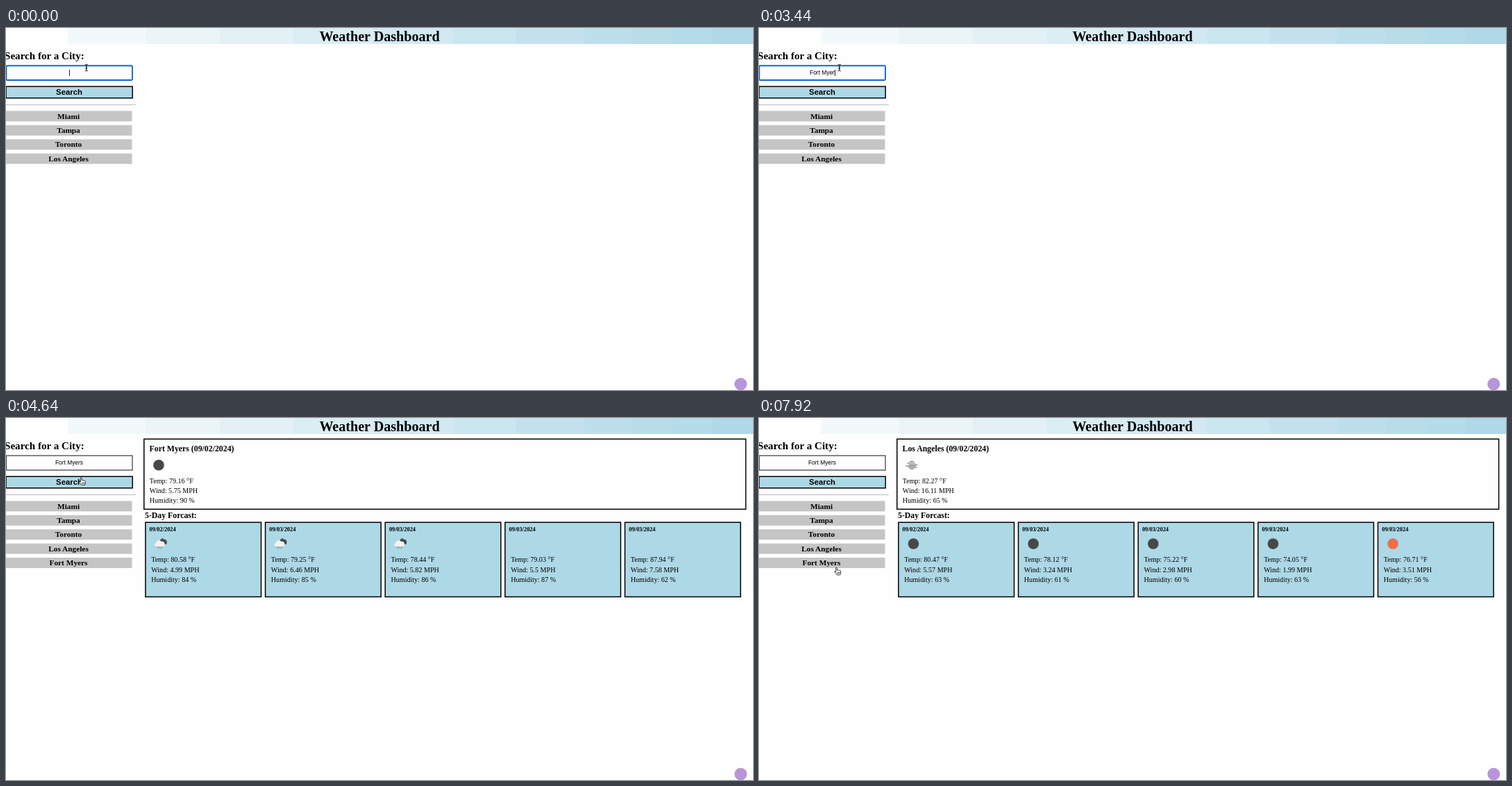
These frames come from a looping animation (1076 by 521 pixels, 8000 ms). An HTML page:

```html
<!DOCTYPE html>
<html lang="en">
<head>
<meta charset="utf-8">
<title>Weather Dashboard</title>
<style>
  html, body { margin: 0; width: 100%; height: 100%; overflow: hidden; background: #fefefe; }
  svg { display: block; width: 100%; height: 100%; }
  text { font-family: "Liberation Serif", "Times New Roman", serif; font-size: 10.08px; fill: #000; }
  .bold { font-weight: bold; }
  .mid { text-anchor: middle; }
  .sans { font-family: "Liberation Sans", Arial, sans-serif; }
  .h1 { font-size: 20.1px; }
  .h2 { font-size: 15.1px; }
  .h3 { font-size: 11.8px; }
  .btn { font-size: 11.34px; }
  .small { font-size: 8.4px; }
  .box { stroke: #000; stroke-width: 1.5; }
</style>
</head>
<body>
<svg viewBox="0 0 1076 521" xmlns="http://www.w3.org/2000/svg">
  <defs>
    <linearGradient id="sky"></linearGradient>
    <path id="puff" d="M-6 6A3.6 3.6 0 0 1-6.2-1A5.2 5.2 0 0 1 3.2-3A4.4 4.4 0 0 1 6.2 6Z"/>
    <circle id="moon" r="7.8" fill="#484848"/>
    <circle id="sun" r="7.8" fill="#ec6e4c"/>
    <use id="cloud" href="#puff" fill="#f2f2f2"/>
    <g id="partly">
      <circle cx="4.6" cy="-.6" r="6.4" fill="#ec6e4c"/>
      <use href="#puff" transform="translate(-1.6 1.6) scale(.88)" fill="#f2f2f2"/>
    </g>
    <g id="rain">
      <use href="#puff" transform="translate(3.4 -3.6) scale(.62 .78)" fill="#484848"/>
      <use href="#puff" transform="translate(-1.4 -.8) scale(.8 .78)" fill="#f2f2f2"/>
      <path d="M-4 3.8l-1 2M-.6 3.8l-1 2M2.8 3.8l-1 2M-2.6 6l-.7 1.4M.8 6l-.7 1.4" stroke="#555" stroke-width=".8"/>
    </g>
    <path id="mist" d="M-3-5.2H3M-6.5-2.8H5M-4-.5H8.5M-8.5 1.3H6M-5 3.3H7.5M-3 5.3H3.5" stroke="#484848" stroke-width=".9"/>
  </defs>

  <rect width="1076" height="23" fill="url(#sky)"/>
  <text class="bold mid h1" x="538" y="18.5">Weather Dashboard</text>
  <text class="bold h2" x="-2" y="44.5">Search for a City:</text>

  <rect id="field" x=".4" y="54.2" width="181.6" height="20.8" fill="#fefefe"/>
  <text id="query" class="sans mid small" x="91" y="67.3"></text>
  <rect id="caret" y="60" width="1" height="9" fill="#222"/>

  <rect class="box" x="0" y="84.2" width="182.2" height="16.6" fill="#add8e6"/>
  <text class="sans bold mid btn" x="91" y="96.2">Search</text>
  <rect y="110" width="187" height="1" fill="#c3b9ca"/>
  <g id="history"></g>
  <g id="reports"></g>

  <circle cx="1058.3" cy="512.5" r="9" fill="#b795d8"/>

  <path id="beam" d="M113.7 52.2q2.1 0 2.1 1.6v6.6q0 1.6-2.1 1.6M117.9 52.2q-2.1 0-2.1 1.6v6.6q0 1.6 2.1 1.6M114.4 57.8h2.8" fill="none" stroke="#222" stroke-width="1"/>
  <path id="hand" d="M2.7 7.2V1.8Q2.7.7 3.6.7T4.5 1.8V4.6Q5.3 3.9 6.3 4.9Q7.3 4.3 8.1 5.3Q9.8 5 9.8 6.6Q9.8 9 8.9 11.4H4.2Q3.3 9.6 1 7.3Q.7 6.2 1.7 6.3ZM5.2 7.6v2M6.6 7.6v2M8 7.6v2" fill="#fff" stroke="#222" stroke-width=".9" stroke-linejoin="round"/>
</svg>
<script>
const LOOP = 8000;
const $ = id => document.getElementById(id);
const show = (el, on) => { el.style.visibility = on ? 'visible' : 'hidden'; };

// Header shading in flat bands from white to light blue
const edges = [0, 89, 201, 308, 415, 530, 645, 735, 833, 902, 960, 1018, 1076];
$('sky').innerHTML = edges.slice(1).map((end, i) => {
  const start = edges[i], k = i ? (start + end) / 2152 : 0;
  const mix = c => Math.round(254 + (c - 254) * k);
  const color = `rgb(${mix(173)},${mix(216)},${mix(230)})`;
  return [start, end].map(x => `<stop offset="${x / 1076}" stop-color="${color}"/>`).join('');
}).join('');

const cities = ['Miami', 'Tampa', 'Toronto', 'Los Angeles', 'Fort Myers'];
$('history').innerHTML = cities.map((name, i) => `<g transform="translate(0 ${i * 20.4})">
  <rect y="119.4" width="181.5" height="15" fill="#c5c5c5"/>
  <text class="bold mid btn" x="90" y="130.6">${name}</text></g>`).join('');

// Each row: icon, temperature, wind, humidity; the first row is the current weather
const reports = [
  { city: 'Fort Myers', from: 4640, to: 7020, loaded: 5080, late: ['cloud', 'partly'], rows: [
    ['moon', '79.16', '5.75', 90], ['rain', '80.58', '4.99', 84], ['rain', '79.25', '6.46', 85],
    ['rain', '78.44', '5.82', 86], ['cloud', '79.03', '5.5', 87], ['partly', '87.94', '7.58', 62]] },
  { city: 'Los Angeles', from: 7020, to: LOOP, loaded: 7170, late: ['mist', 'sun'], rows: [
    ['mist', '82.27', '16.11', 65], ['moon', '80.47', '5.57', 63], ['moon', '78.12', '3.24', 61],
    ['moon', '75.22', '2.98', 60], ['moon', '74.05', '1.99', 63], ['sun', '76.71', '3.51', 56]] }
];

const lines = ([, temp, wind, wet], x, y) =>
  [`Temp: ${temp} °F`, `Wind: ${wind} MPH`, `Humidity: ${wet} %`]
    .map((s, i) => `<text x="${x}" y="${y + i * 14.2}">${s}</text>`).join('');

function drawReport({ city, rows, late }) {
  const icon = (name, x, y) =>
    `<use href="#${name}" x="${x}" y="${y}"${late.includes(name) ? ' data-late' : ''}/>`;
  const [now, ...days] = rows;
  const cards = days.map((day, i) => `<g transform="translate(${i * 172.65} 0)">
    <rect class="box" x="200.9" y="150.2" width="166.6" height="107.2" fill="#add8e6"/>
    <text class="bold small" x="206.6" y="163.2">09/0${i ? 3 : 2}/2024</text>
    ${icon(day[0], 222.5, 181)}${lines(day, 209.2, 207.3)}</g>`).join('');
  return `<rect class="box" x="198.8" y="30.3" width="866.8" height="101" fill="#fefefe"/>
    <text class="bold h3" x="206.6" y="48">${city} (09/02/2024)</text>
    ${icon(now[0], 220, 67.8)}${lines(now, 206.8, 93.8)}
    <text class="bold h3" x="200" y="144">5-Day Forcast:</text>${cards}`;
}

for (const r of reports) {
  r.el = document.createElementNS('http://www.w3.org/2000/svg', 'g');
  r.el.innerHTML = drawReport(r);
  r.lateIcons = r.el.querySelectorAll('[data-late]');
  $('reports').append(r.el);
}

// Moments at which each letter of the query appears
const word = 'Fort\u00a0Myers';
const keys = [1190, 1490, 1640, 1790, 1940, 2840, 3140, 3290, 3440, 3740];
// Pointer stops: time, x, y
const stops = [
  [3890, 107, 78], [4040, 104.6, 85], [5530, 126, 102], [5680, 156, 122], [5830, 168, 131.4],
  [6120, 154, 145], [6270, 132, 168], [6420, 113, 188], [6570, 107.5, 196], [6720, 108, 189],
  [7620, 108, 197], [7770, 108, 208], [7920, 108, 214.4]
];
const blurAt = 4190, savedAt = 4340;
const within = (t, a, b) => t >= a && t < b;

function render(t) {
  const query = $('query'), field = $('field'), caret = $('caret');
  const typed = word.slice(0, keys.filter(k => k <= t).length);
  if (query.textContent !== typed) query.textContent = typed;

  const focused = t < blurAt;
  field.setAttribute('stroke', focused ? '#1566cc' : '#555');
  field.setAttribute('stroke-width', focused ? 1.9 : 1.4);
  field.setAttribute('rx', focused ? 1.5 : 0);
  caret.setAttribute('x', Math.round(90.6 + (typed ? query.getComputedTextLength() / 2 : 0)));
  show(caret, focused && !within(t, 140, 590) && !within(t, 2540, 2840));

  const stop = stops.filter(s => s[0] <= t).pop();
  show($('beam'), !stop);
  show($('hand'), stop);
  if (stop) $('hand').setAttribute('transform', `translate(${stop[1]} ${stop[2]})`);

  show($('history').lastElementChild, t >= savedAt);
  for (const r of reports) {
    const on = within(t, r.from, r.to);
    show(r.el, on);
    r.lateIcons.forEach(el => show(el, on && t >= r.loaded));
  }
}

const begin = performance.now();
function tick() {
  render((performance.now() - begin) % LOOP);
  requestAnimationFrame(tick);
}
tick();
</script>
</body>
</html>
```
